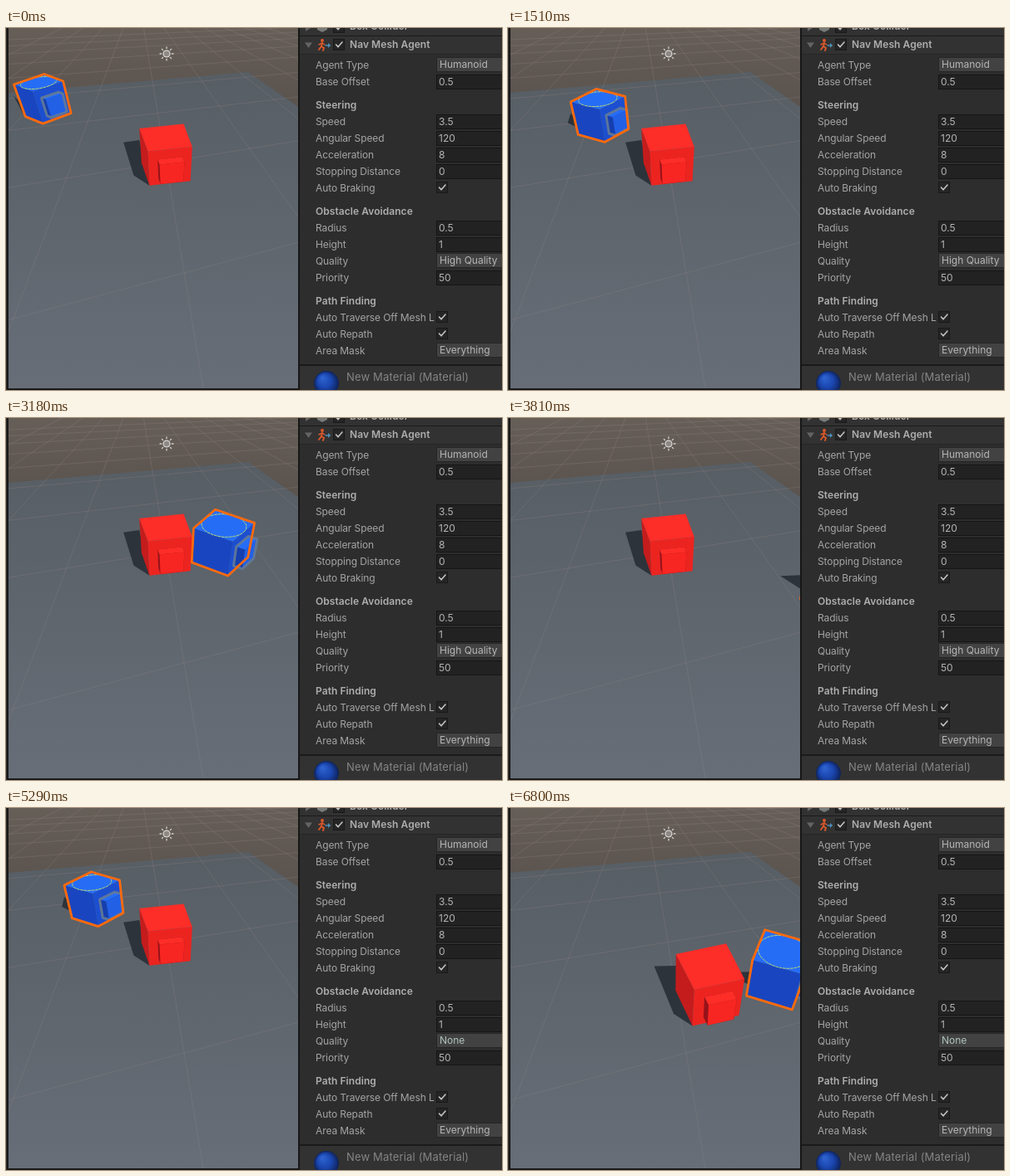
These frames come from a looping animation (596x436 px, 6870 ms). An HTML page with a canvas:

```html
<!DOCTYPE html>
<html lang="en">
<head>
<meta charset="utf-8">
<title>Nav Mesh Agent</title>
<style>
  html, body { margin: 0; width: 596px; height: 436px; overflow: hidden; background: #2d2d2d; }
  #stage { position: relative; width: 596px; height: 436px; overflow: hidden; }
  canvas { position: absolute; left: 0; top: 0; }
  .t { position: absolute; height: 16px; white-space: nowrap; overflow: hidden;
       font: 12px/16px Inter, Roboto, sans-serif; letter-spacing: -0.1px; color: #a5a5a5; }
  .b { font-weight: 600; letter-spacing: 0.06px; color: #aeaeae; }
  .v { letter-spacing: 0; color: #b6b6b6; }
  .m { font-size: 13px; letter-spacing: 0.17px; color: #858585; }
</style>
</head>
<body>
<div id="stage"><canvas id="c" width="596" height="436"></canvas></div>
<script>
const LOOP = 6870, START = 590, RESET = 4020, RESTART = 4420;
const stage = document.getElementById('stage');
const g = document.getElementById('c').getContext('2d');

// ---------- panel text ----------
function label(text, x, y, cls = '', w = 0) {
  const d = document.createElement('div');
  d.className = 't ' + cls;
  d.textContent = text;
  d.style.left = x + 'px';
  d.style.top = (y - 8) + 'px';
  if (w) d.style.width = w + 'px';
  stage.appendChild(d);
  return d;
}

// kind: h = heading, d = dropdown, f = field, c = checkbox
const rows = [
  ['d', 'Agent Type', 'Humanoid'], ['f', 'Base Offset', '0.5'],
  ['h', 'Steering'], ['f', 'Speed', '3.5'], ['f', 'Angular Speed', '120'],
  ['f', 'Acceleration', '8'], ['f', 'Stopping Distance', '0'], ['c', 'Auto Braking'],
  ['h', 'Obstacle Avoidance'], ['f', 'Radius', '0.5'], ['f', 'Height', '1'],
  ['d', 'Quality', 'High Quality'], ['f', 'Priority', '50'],
  ['h', 'Path Finding'], ['c', 'Auto Traverse Off Mesh Link'],
  ['c', 'Auto Repath'], ['d', 'Area Mask', 'Everything']
].map(([kind, name, value]) => ({ kind, name, value }));

let rowY = 25, quality;
for (const r of rows) {
  r.y = rowY += r.kind === 'h' ? 28 : 20;
  label(r.name, 372, r.y, r.kind === 'h' ? 'b' : '', 143);
  if (!r.value) continue;
  const drop = r.kind === 'd';
  const d = label(r.value, drop ? 521 : 520, r.y - drop, 'v', 75);
  if (r.name === 'Quality') quality = d;
}
label('Box Collider', 413, -2, 'b');
label('Nav Mesh Agent', 413, 20, 'b');
label('New Material (Material)', 409, 420, 'm');

// ---------- drawing helpers ----------
function rect(x, y, w, h, fill) { g.fillStyle = fill; g.fillRect(x, y, w, h); }

function trace(pts, close) {
  g.beginPath();
  pts.forEach(([x, y], i) => i ? g.lineTo(x, y) : g.moveTo(x, y));
  if (close) g.closePath();
}
function poly(pts, fill) { trace(pts, true); g.fillStyle = fill; g.fill(); }
function line(pts, color, w, close) {
  trace(pts, close);
  g.strokeStyle = color; g.lineWidth = w; g.lineJoin = g.lineCap = 'round';
  g.stroke();
}
function disc(x, y, r, fill) {
  g.beginPath(); g.arc(x, y, r, 0, 7); g.fillStyle = fill; g.fill();
}
function shade(y0, y1, c0, c1) {
  const s = g.createLinearGradient(0, y0, 0, y1);
  s.addColorStop(0, c0); s.addColorStop(1, c1);
  return s;
}
const mix = (a, b, k) => a + (b - a) * k;
const add = (p, q, k = 1) => [p[0] + q[0] * k, p[1] + q[1] * k];
const sub = (p, q) => [p[0] - q[0], p[1] - q[1]];
const mid = pts => pts.reduce((s, p) => add(s, p, 1 / pts.length), [0, 0]);

function hull(pts) {
  const p = pts.slice().sort((a, b) => a[0] - b[0] || a[1] - b[1]);
  const half = list => {
    const h = [];
    for (const q of list) {
      while (h.length > 1) {
        const u = sub(h[h.length - 1], h[h.length - 2]), v = sub(q, h[h.length - 2]);
        if (u[0] * v[1] - u[1] * v[0] > 0) break;
        h.pop();
      }
      h.push(q);
    }
    return h.slice(0, -1);
  };
  return half(p).concat(half(p.reverse()));
}

// ---------- motion ----------
// keys are [time, x, yaw] on a straight walk, or [time, x, yaw, y]
const firstWalk = [[520, 39, 58], [870, 51, 60], [2130, 165, 23], [3180, 262, 29], [3390, 297, 27], [3960, 440, 15]];
const secondWalk = [[4350, 33, 56], [4688, 35.5, 55], [5894, 171, 32], [6765, 331, 14]];
const pushed = [[5770, 192, 79, 132], [5894, 210, 76, 142], [6430, 243, 70, 191]];

function at(keys, t) {
  let i = 1;
  while (i < keys.length - 1 && t > keys[i][0]) i++;
  const [a, b] = [keys[i - 1], keys[i]];
  const k = Math.min(1, Math.max(0, (t - a[0]) / (b[0] - a[0])));
  return a.map((v, j) => mix(v, b[j], k)).slice(1);
}
// movement advances in even ticks
function tick(t) {
  if (t < START) return 0;
  if (t < RESET) return START + Math.floor((t - START) / 70) * 70;
  if (t < RESTART) return RESET;
  return RESTART + Math.floor((t - RESTART) / 67) * 67;
}

// ---------- boxes ----------
// x, y is the middle of the lid; size, tilt and skew follow the place on screen
function box(x, y, yaw) {
  const a = yaw * Math.PI / 180;
  const size = 21.5 + 0.085 * (y - 66), tilt = 0.32 + 0.003 * (y - 66), skew = (x - 195) * 0.0009;
  const flat = (px, py) => [px * size, (py * tilt + px * skew) * size];
  const u = flat(Math.cos(a), Math.sin(a)), v = flat(Math.sin(a), -Math.cos(a));
  const lid = [[-1, -1], [-1, 1], [1, 1], [1, -1]].map(([i, j]) => add(add([x, y], u, i), v, j));
  const base = lid.map(p => add(p, [(195 - p[0]) * 0.075, 36 + 0.04 * y]));
  const face = [lid[3], lid[2], base[2], base[3]], c = mid(face);
  const back = face.map(p => add(add(c, sub(p, c), 0.56), [0, 2]));
  const snout = back.map(p => add(p, u, 0.45));
  return { x, y, u, v, size, lid, base, face, back, snout };
}

function drawShadow({ x, size, lid, base }) {
  const k = size * Math.max(0, Math.min(1, (x - 20) / 130));
  poly([add(lid[0], [0, 14]), add(base[0], [-0.8 * k, -0.9 * k]),
        add(base[3], [-0.7 * k, -0.45 * k]), base[3]], '#2d333b');
}

function drawBox({ lid, base, face, back, snout }, paint) {
  poly([lid[0], lid[3], base[3], base[0]], paint.side);
  poly(face, paint.front);
  poly(lid, paint.top);
  poly(hull([...back, ...snout]), paint.dark);
  poly(snout, paint.snout);
  poly([back[0], back[1], snout[1], snout[0]], paint.top);
}
const BLUE = { top: '#266df6', side: '#1946c0', front: '#1c4fd0', dark: '#163fae', snout: '#2260e6' };
const RED = { top: '#fd2d28', side: '#c41c1c', front: '#ec2420', dark: '#96131a', snout: '#f82622' };

function drawMarks({ x, y, u, v, lid, base, back, snout }) {
  line(hull([...back, ...snout]), 'rgba(100,122,150,.9)', 3, true);
  const ring = Array.from({ length: 40 }, (_, i) => {
    const s = i * Math.PI / 20;
    return add(add([x, y], u, Math.cos(s)), v, Math.sin(s));
  });
  g.setLineDash([3, 1.5]);
  line(ring, '#b5d878', 1, true);
  g.setLineDash([]);
  line(hull([...lid, ...base]), '#ff6a0c', 2.8, true);
}

// ---------- scene ----------
function ground() {
  rect(3, 0, 348, 110, shade(0, 100, '#665f58', '#59524d'));
  poly([[3, 78], [291, 53], [351, 95], [351, 434], [3, 434]], shade(55, 434, '#575e64', '#676e78'));
  const faint = 'rgba(150,135,135,.28)';
  for (let k = -4; k < 7; k++) line([[158, -45], [237 + 260 * k, 434]], faint, 1);
  for (let k = 0; k < 9; k++) line([[3, 1 / (0.00249 + 0.00164 * k) - 50], [1500, -50]], faint, 1);
}

function sun() {
  const o = [193, 31];
  disc(...o, 4.6, '#d8d5d2');
  disc(...o, 3.3, '#8d8884');
  for (let i = 0; i < 8; i++) {
    const a = i * Math.PI / 4, u = [Math.cos(a), Math.sin(a)];
    line([add(o, u, 6.3), add(o, u, 8)], '#d0cdca', 1.3);
  }
}

function scene(t) {
  const first = t < RESET;
  const [x, yaw] = at(first ? firstWalk : secondWalk, t);
  const blue = box(x, first ? 66 + 0.285 * (x - 39) : 65 + 0.366 * (x - 35), yaw);
  const [rx, ryaw, ry] = at(pushed, t);
  const red = box(rx, ry, ryaw);
  ground();
  sun();
  drawShadow(red);
  drawShadow(blue);
  drawBox(blue, BLUE);
  drawBox(red, RED);
  drawMarks(blue);
}

// ---------- panel ----------
function check(x, y) {
  rect(x - 7, y - 7, 14, 14, '#191919');
  rect(x - 6, y - 6, 12, 12, '#252525');
  line([[x - 3.5, y], [x - 1, y + 2.8], [x + 4, y - 3]], '#c2c2c2', 1.6);
}

function panel() {
  rect(351, 0, 245, 436, '#2d2d2d');
  rect(351, 0, 2, 436, '#171717');
  rect(353, 0, 243, 31, '#323232');
  rect(353, 9, 243, 1, '#1a1a1a');
  rect(353, 31, 243, 1, '#262626');
  poly([[360, -4], [366, 0], [360, 4]], '#646464');
  poly([[359, 17.5], [368, 17.5], [363.5, 24]], '#646464');
  poly([[374, -4], [386, -4], [386, 2], [380, 5], [374, 2]], '#777c78');
  check(400, -1); check(400, 20);
  // walking figure and arrow
  disc(380, 15, 2, '#d9582b');
  line([[380, 18], [379, 22], [382, 24], [381, 27]], '#d9582b', 2);
  line([[379, 22], [376, 26]], '#d9582b', 2);
  line([[376, 20], [380, 18], [383, 20]], '#d9582b', 1.5);
  line([[384, 21], [389, 21]], '#4d8fb8', 1.4);
  poly([[387, 18], [390, 21], [387, 24]], '#4d8fb8');
  for (const { kind, y } of rows) {
    if (kind === 'c') check(524, y - 1);
    if (kind === 'f') {
      rect(517, y - 9, 79, 18, '#151515');
      rect(518, y - 8, 78, 16, '#222222');
    }
    if (kind === 'd') {
      rect(517, y - 10, 79, 18, '#252525');
      rect(518, y - 9, 78, 16, '#424242');
    }
  }
  rect(353, 405, 243, 2, '#1a1a1a');
  rect(353, 407, 243, 29, '#323232');
  const ball = g.createRadialGradient(380, 421, 1, 385, 428, 15);
  ball.addColorStop(0, '#2e63d0'); ball.addColorStop(.55, '#1a45ae'); ball.addColorStop(1, '#0e2258');
  disc(385, 428, 15, ball);
}

function draw(now) {
  const t = now % LOOP;
  rect(0, 0, 596, 436, '#191919');
  rect(0, 0, 1, 436, '#2d2d2d');
  g.save();
  g.beginPath(); g.rect(3, 0, 348, 434); g.clip();
  scene(tick(t));
  g.restore();
  panel();
  const none = t >= RESET;
  quality.textContent = none ? 'None' : 'High Quality';
  quality.style.color = none ? '#b0c4ba' : '';
}

const t0 = performance.now();
function frame() {
  draw(performance.now() - t0);
  requestAnimationFrame(frame);
}
frame();
</script>
</body>
</html>
```
